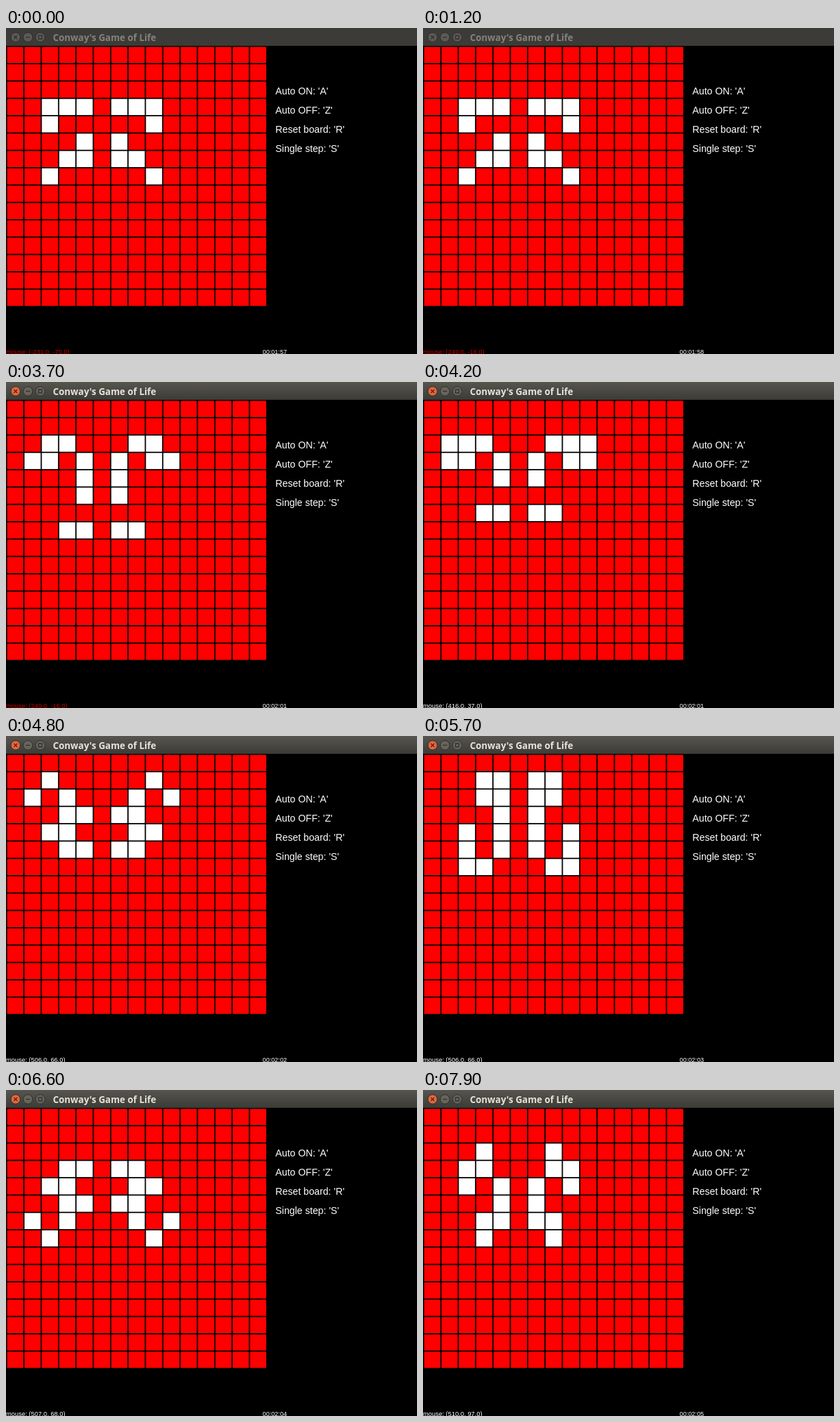
Animation of 600 by 476 pixels, one loop 8 s. Source, as an HTML page:

```html
<!DOCTYPE html>
<html lang="en">
<head>
<meta charset="utf-8">
<title>Conway's Game of Life</title>
<style>
  html, body { margin: 0; width: 100%; height: 100%; overflow: hidden; background: #000; }
  svg { display: block; width: 600px; height: 476px; }
  text { font-family: "Liberation Sans", Arial, sans-serif; fill: #fff; white-space: pre; }
  .title { font: 700 13.4px "Open Sans", "Noto Sans", sans-serif; }
  .menu { font-size: 14.2px; }
</style>
</head>
<body>
<svg id="stage" viewBox="0 0 600 476">
  <defs>
    <linearGradient id="active" x2="0" y2="1">
      <stop offset="0" stop-color="#57554e"/>
      <stop offset="1" stop-color="#3c3b37"/>
    </linearGradient>
  </defs>
  <rect width="600" height="476"/>
</svg>
<script>
const LOOP = 8000;
const SIZE = 15, PITCH = 25.33, LEFT = 0.8, TOP = 26.7, GAP = 1.8;
const STEP = 290, FIRST_STEP = 3110, LAST_GENERATION = 15;
const FOCUS_AT = 1300, CLOCK_START = 117, CLOCK_PHASE = 600;

// Pointer keys: time, x, y
const POINTER = [
  [100, -231, -70], [1200, 249, -16], [3900, 249, -16], [4400, 506, 66],
  [5800, 506, 66], [6000, 507, 68], [7300, 507, 68], [7700, 510, 97]
];

const SEED = ["", "", "", "..XXX.XXX", "..X.....X", "....X.X", "...XX.XX", "..X.....X"];

const stage = document.getElementById("stage");

function add(tag, attrs, text) {
  const node = document.createElementNS("http://www.w3.org/2000/svg", tag);
  for (const key in attrs) node.setAttribute(key, attrs[key]);
  if (text) node.textContent = text;
  return stage.appendChild(node);
}

const range = n => Array.from({ length: n }, (_, i) => i);

function nextBoard(board) {
  const alive = (r, c) => board[r]?.[c] ? 1 : 0;
  return board.map((row, r) => row.map((cell, c) => {
    let count = -alive(r, c);
    for (let dr = -1; dr <= 1; dr++)
      for (let dc = -1; dc <= 1; dc++) count += alive(r + dr, c + dc);
    return count === 3 || (cell && count === 2);
  }));
}

const generations = [range(SIZE).map(r => range(SIZE).map(c => SEED[r]?.[c] === "X"))];
while (generations.length <= LAST_GENERATION) generations.push(nextBoard(generations.at(-1)));

// Window frame
const bar = add("rect", { width: 600, height: 26 });
const buttons = [14, 32, 50].map(x =>
  add("circle", { cx: x, cy: 13.5, r: 6.8, stroke: "#302f2b", "stroke-width": 1 }));
const glyphs = ["M11.5 11l5 5m0-5l-5 5", "M29 13.5h6", "M47.5 11h5v5h-5z"].map(d =>
  add("path", { d, fill: "none", stroke: "#33312d", "stroke-width": 1.3 }));
const title = add("text", { class: "title", x: 68.5, y: 18.5 }, "Conway's Game of Life");

// Board
const cells = range(SIZE).map(r => range(SIZE).map(c => add("rect", {
  x: LEFT + c * PITCH + GAP / 2, y: TOP + r * PITCH + GAP / 2,
  width: PITCH - GAP, height: PITCH - GAP
})));

["Auto ON: 'A'", "Auto OFF: 'Z'", "Reset board: 'R'", "Single step: 'S'"].forEach((label, i) =>
  add("text", { class: "menu", x: 393.3, y: 96.7 + i * 28.1 }, label));

const pointerLabel = add("text", { x: 0, y: 475.8, "font-size": 9.4 });
const clock = add("text", { x: 374.6, y: 475.8, "font-size": 9.1 });

function pointerAt(t) {
  const next = POINTER.findIndex(key => key[0] > t);
  if (next === 0) return POINTER[0].slice(1);
  if (next < 0) return POINTER.at(-1).slice(1);
  const a = POINTER[next - 1], b = POINTER[next];
  const u = (t - a[0]) / (b[0] - a[0]), ease = u * u * (3 - 2 * u);
  return [1, 2].map(i => Math.round(a[i] + (b[i] - a[i]) * ease));
}

function draw(t) {
  const focused = t >= FOCUS_AT;
  bar.setAttribute("fill", focused ? "url(#active)" : "#3c3b37");
  title.style.fill = focused ? "#e6e2da" : "#85827b";
  buttons.forEach((button, i) =>
    button.setAttribute("fill", focused && i === 0 ? "#e5673e" : focused ? "#66645c" : "#5c5a54"));
  glyphs[0].setAttribute("stroke", focused ? "#5a2410" : "#33312d");

  const step = Math.floor((t - FIRST_STEP) / STEP) + 1;
  const board = generations[Math.max(0, Math.min(LAST_GENERATION, step))];
  cells.forEach((row, r) => row.forEach((cell, c) =>
    cell.setAttribute("fill", board[r][c] ? "#fff" : "#f00")));

  const [x, y] = pointerAt(t);
  pointerLabel.textContent = `mouse: (${x.toFixed(1)}, ${y.toFixed(1)})`;
  pointerLabel.style.fill = x >= 0 && y >= 0 ? "#fff" : "#c80000";

  const seconds = CLOCK_START + Math.floor((t - CLOCK_PHASE) / 1000) + 1;
  const pad = n => String(n).padStart(2, "0");
  clock.textContent = `00:${pad(Math.floor(seconds / 60))}:${pad(seconds % 60)}`;
}

const start = performance.now();
function tick() {
  draw((performance.now() - start) % LOOP);
  requestAnimationFrame(tick);
}
tick();
</script>
</body>
</html>
```
